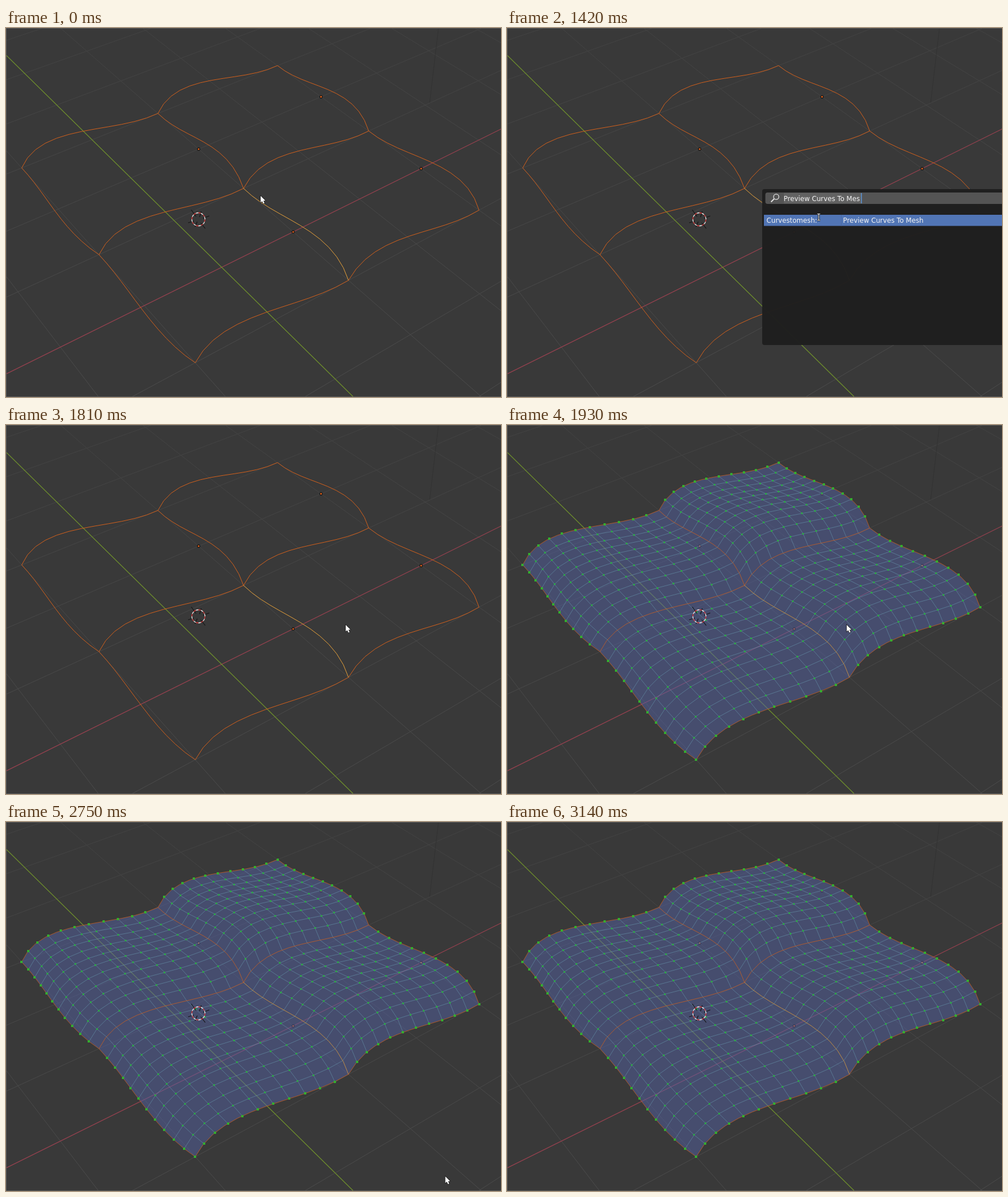
An HTML page with a canvas that plays this animation: 867x646 px, repeating every 4510 ms.

```html
<!DOCTYPE html>
<html lang="en">
<head>
<meta charset="utf-8">
<title>Curves to mesh</title>
<style>
html, body { margin: 0; width: 100%; height: 100%; overflow: hidden; background: #393939; }
canvas { display: block; }
</style>
</head>
<body>
<canvas id="stage" width="867" height="646"></canvas>
<script>
const ctx = document.getElementById('stage').getContext('2d');
const W = 867, H = 646, LOOP = 4510, SEGMENTS = 11;

// Perspective view; a and b count patches on the floor, z is half a patch.
function project([a, b, z]) {
  const w = 1 - .1017 * a - .0717 * b - .056 * z;
  return [
    (415.5 + 122.9 * a - 264.8 * b - 24.2 * z) / w + .5,
    (280.3 + 116.1 * a + 87.6 * b - 134.4 * z) / w + .5
  ];
}

// Bezier profile of every curve: distance s from its steep end, height z.
function profile(t) {
  const r = 1 - t, near = 3 * r * r * t, far = 3 * r * t * t;
  return { s: .173 * near + .657 * far + t ** 3, z: .52 * near - .05 * far };
}
function alongA(end, b, t) {
  const { s, z } = profile(t);
  return b === 1 ? [end - s, b + z * .26, z * .51] : [end - s, b, z];
}
function alongB(a, end, t) {
  const { s, z } = profile(t);
  return [a, end - s, z];
}

// Coons patch spanned by its four border curves.
function surface(a, b, p, q) {
  const a0 = alongA(a, b, p), a1 = alongA(a, b - 1, p);
  const b0 = alongB(a, b, q), b1 = alongB(a - 1, b, q);
  const flat = [a - p, b - q, 0];
  return flat.map((f, k) =>
    (1 - q) * a0[k] + q * a1[k] + (1 - p) * b0[k] + p * b1[k] - f);
}

function sample(fn, n = SEGMENTS) {
  return Array.from({ length: n + 1 }, (_, i) => project(fn(i / n)));
}
function addLine(path, points) {
  points.forEach(([x, y], i) => i ? path.lineTo(x, y) : path.moveTo(x, y));
}
function stroke(points, color, width = 1) {
  const path = new Path2D();
  addLine(path, points);
  ctx.strokeStyle = color;
  ctx.lineWidth = width;
  ctx.stroke(path);
}
function rect(x, y, w, h, color) {
  ctx.fillStyle = color;
  ctx.fillRect(x, y, w, h);
}
function roundRect(x, y, w, h, r, color) {
  ctx.fillStyle = color;
  ctx.beginPath();
  ctx.roundRect(x, y, w, h, r);
  ctx.fill();
}

const floorA = a => [project([a, -8, 0]), project([a, Math.min(6, 7 - a), 0])];
const floorB = b => [project([-8, b, 0]), project([Math.min(5, 7 - b), b, 0])];

const PATCHES = [[0, 0], [0, 1], [1, 0], [1, 1]];
const ORIGINS = [[-.5, -1], [-.5, 0], [.5, -1], [.5, 0]];
const CURVES = [];
for (const end of [0, 1]) {
  for (const side of [-1, 0, 1]) {
    CURVES.push({ points: sample(t => alongA(end, side, t), 12), active: end === 1 && side === 0 });
    CURVES.push({ points: sample(t => alongB(side, end, t), 12) });
  }
}

const fillPath = new Path2D(), wirePath = new Path2D(), dots = [];
for (const [a, b] of PATCHES) {
  const at = (p, q) => surface(a, b, p, q);
  addLine(fillPath, [
    ...sample(t => at(t, 0)), ...sample(t => at(1, t)),
    ...sample(t => at(1 - t, 1)), ...sample(t => at(0, 1 - t))
  ]);
  fillPath.closePath();
  for (let i = 0; i <= SEGMENTS; i++) {
    const k = i / SEGMENTS;
    if (i % SEGMENTS) {
      addLine(wirePath, sample(t => at(k, t)));
      addLine(wirePath, sample(t => at(t, k)));
    }
    for (let j = 0; j <= SEGMENTS; j++) {
      const seam = i === a * SEGMENTS || j === b * SEGMENTS;
      const border = i === (1 - a) * SEGMENTS || j === (1 - b) * SEGMENTS;
      if (!seam) dots.push({ at: project(at(k, j / SEGMENTS)), border });
    }
  }
}

function drawFloor() {
  rect(0, 0, W, H, '#393939');
  const shade = ctx.createLinearGradient(0, 0, 0, H);
  shade.addColorStop(0, '#424242');
  shade.addColorStop(1, '#4b4b4b');
  for (let g = -5; g <= 3.5; g += .5) {
    if (g === .5) continue;
    stroke(floorA(g), shade);
    stroke(floorB(g), shade);
  }
  stroke([[757.5, 0], [742, 131]], '#323232');
  stroke(floorA(.5), '#97414f', 1.2);
  stroke(floorB(.5), '#6f902c', 1.3);
}

function drawOrigins() {
  for (const [a, b] of ORIGINS) {
    const [x, y] = project([a, b, 0]);
    ctx.beginPath();
    ctx.arc(x, y, 2.2, 0, 7);
    ctx.fillStyle = '#d9601c';
    ctx.fill();
    ctx.strokeStyle = '#151515';
    ctx.lineWidth = 1.2;
    ctx.stroke();
  }
}

function drawCurves() {
  for (const { points, active } of CURVES) stroke(points, active ? '#e5a03a' : '#d2601c');
}

function drawMesh() {
  ctx.fillStyle = 'rgba(85,99,163,.5)';
  ctx.fill(fillPath);
  ctx.strokeStyle = 'rgba(112,168,188,.45)';
  ctx.lineWidth = 1;
  ctx.stroke(wirePath);
  ctx.globalAlpha = .75;
  drawCurves();
  ctx.globalAlpha = 1;
  for (const { at: [x, y], border } of dots) {
    const size = border ? 4 : 3;
    rect(Math.round(x - size / 2), Math.round(y - size / 2), size, size, border ? '#35ad2f' : '#2fa34a');
  }
}

function drawCursor3D() {
  const ticks = [
    [-12.5, -16.5, -4, -5], [4, 6, 12, 16], [-18, 6, -8, 3],
    [8, -2, 19, -6], [5, -14, 2, -4], [-2, 4, -6, 13]
  ];
  for (const [x1, y1, x2, y2] of ticks) {
    stroke([[337 + x1, 335 + y1], [337 + x2, 335 + y2]], '#141414', 1.2);
  }
  for (let i = 0; i < 16; i++) {
    ctx.beginPath();
    ctx.arc(337, 335, 11.5, i * Math.PI / 8, (i + 1) * Math.PI / 8);
    ctx.strokeStyle = i % 2 ? '#f2f2f2' : '#e03a3a';
    ctx.lineWidth = 1.3;
    ctx.stroke();
  }
}

function drawSearch() {
  roundRect(447, 282, 430, 273, 4, 'rgba(30,30,30,.97)');
  roundRect(452.5, 288, 430, 20, 4, '#545454');
  rect(485, 289, 135, 18, '#626262');
  rect(620, 289, 1.5, 18, '#5a94d6');
  ctx.beginPath();
  ctx.arc(471.5, 295.5, 4.6, 0, 7);
  ctx.strokeStyle = '#e4e4e4';
  ctx.lineWidth = 1.3;
  ctx.stroke();
  stroke([[468, 299], [462.5, 304.5]], '#e4e4e4', 1.8);
  rect(450, 327, 417, 19.5, '#5175b5');
  rect(585, 327, 1, 19.5, '#4a69a3');
  ctx.font = '11.75px "DejaVu Sans", sans-serif';
  ctx.fillStyle = '#f4f4f4';
  ctx.fillText('Preview Curves To Mes', 484.5, 302.5);
  ctx.fillText('Curvestomesh:', 454.5, 340.5);
  ctx.fillText('Preview Curves To Mesh', 588.5, 340.5);
}

function drawArrow(x, y) {
  const path = new Path2D();
  addLine(path, [[0, 0], [0, 11.5], [2.6, 9.2], [4.7, 13.4], [6.8, 12.4], [4.8, 8.4], [8.3, 8.2]]
    .map(([dx, dy]) => [x + dx, y + dy]));
  path.closePath();
  ctx.strokeStyle = '#1c1c1c';
  ctx.lineWidth = 1.4;
  ctx.stroke(path);
  ctx.fillStyle = '#fff';
  ctx.fill(path);
}

function drawBeam(x, y) {
  for (const [color, width] of [['#111', 3], ['#eee', 1.2]]) {
    stroke([[x - 2.5, y - 5.5], [x + 2.5, y - 5.5]], color, width);
    stroke([[x - 2.5, y + 5.5], [x + 2.5, y + 5.5]], color, width);
    stroke([[x, y - 5.5], [x, y + 5.5]], color, width);
  }
}

// Start time, pointer shape and position.
const POINTER = [
  [0, drawArrow, 446, 294],
  [1020, drawBeam, 444, 294],
  [1270, drawBeam, 493, 307],
  [1420, drawBeam, 546, 331],
  [1540, drawBeam, 587, 347],
  [1690, drawBeam, 593.5, 350],
  [1810, drawArrow, 595, 350],
  [2330, drawArrow, 608, 359],
  [2480, drawArrow, 652, 452],
  [2600, drawArrow, 704, 564],
  [2750, drawArrow, 769.5, 620.5],
  [2900, drawArrow, 796, 631],
  [3020, drawArrow, 822, 640],
  [3140, () => {}, 0, 0]
];

function frame(now) {
  const t = now % LOOP;
  const meshShown = t >= 1930;
  drawFloor();
  if (!meshShown) drawCurves();
  drawOrigins();
  if (meshShown) drawMesh();
  drawCursor3D();
  if (t >= 1020 && t < 1810) drawSearch();
  rect(0, 0, W, 1, '#5c5c5c');
  rect(0, 0, 1, H, '#5c5c5c');
  rect(0, H - 1, W, 1, '#5c5c5c');
  const [, drawPointer, x, y] = POINTER.findLast(([start]) => start <= t);
  drawPointer(x, y);
}

const begin = performance.now();
function tick() {
  frame(performance.now() - begin);
  requestAnimationFrame(tick);
}
tick();
</script>
</body>
</html>
```
